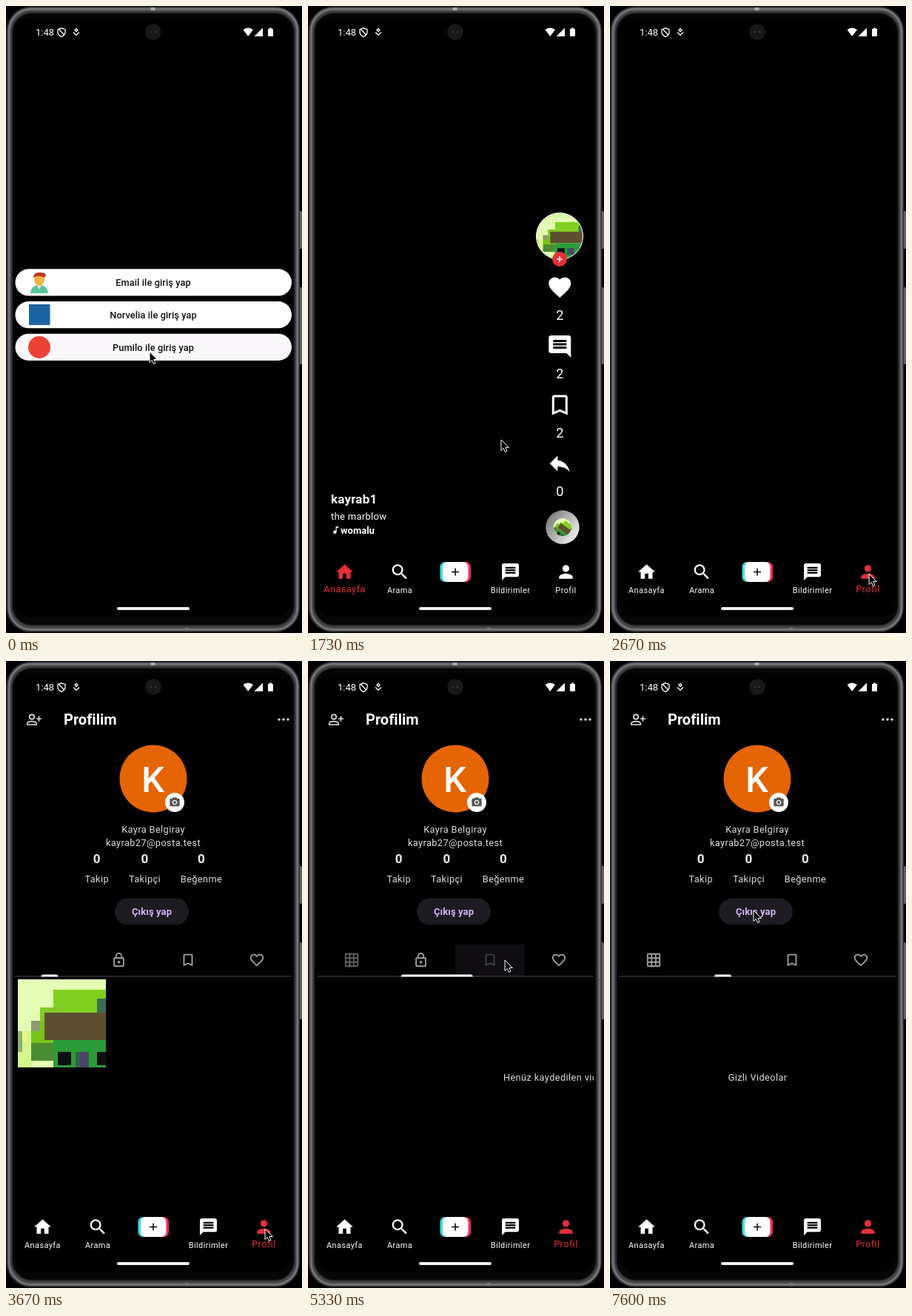
These frames come from a looping animation (400x847 px, 8000 ms). An HTML page:

```html
<!DOCTYPE html>
<html lang="tr">
<head>
<meta charset="utf-8">
<style>
  html, body { margin: 0; width: 100%; height: 100%; overflow: hidden; background: #000; }
  svg { display: block; width: 100%; height: 100%; font-family: Roboto, sans-serif; }
</style>
</head>
<body>
<svg id="stage" viewBox="0 0 400 847"></svg>
<script>
const LOOP = 8000, PAGE = 374, RED = '#e32f38', GREY = 160;

const ICONS = {
  home: 'M10 20v-6h4v6h5v-8h3L12 3 2 12h3v8z',
  search: 'M15.5 14h-.79l-.28-.27C15.41 12.59 16 11.11 16 9.5 16 5.91 13.09 3 9.5 3S3 5.91 3 9.5 5.91 16 9.5 16c1.61 0 3.09-.59 4.23-1.57l.27.28v.79l5 4.99L20.49 19zm-6 0C7.01 14 5 11.99 5 9.5S7.01 5 9.5 5 14 7.01 14 9.5 11.99 14 9.5 14z',
  message: 'M20 2H4c-1.1 0-2 .9-2 2v18l4-4h14c1.1 0 2-.9 2-2V4c0-1.1-.9-2-2-2zM18 14H6v-2h12zm0-3H6V9h12zm0-3H6V6h12z',
  comment: 'M22 4c0-1.1-.9-2-2-2H4c-1.1 0-2 .9-2 2v12c0 1.1.9 2 2 2h14l4 4zM18 14H6v-2h12zm0-3H6V9h12zm0-3H6V6h12z',
  person: 'M12 12c2.21 0 4-1.79 4-4s-1.79-4-4-4-4 1.79-4 4 1.79 4 4 4zm0 2c-2.67 0-8 1.34-8 4v2h16v-2c0-2.66-5.33-4-8-4z',
  heart: 'M12 21.35l-1.45-1.32C5.4 15.36 2 12.28 2 8.5 2 5.42 4.42 3 7.5 3c1.74 0 3.41.81 4.5 2.09C13.09 3.81 14.76 3 16.5 3 19.58 3 22 5.42 22 8.5c0 3.78-3.4 6.86-8.55 11.54z',
  heartLine: 'M16.5 3c-1.74 0-3.41.81-4.5 2.09C10.91 3.81 9.24 3 7.5 3 4.42 3 2 5.42 2 8.5c0 3.78 3.4 6.86 8.55 11.54L12 21.35l1.45-1.32C18.6 15.36 22 12.28 22 8.5 22 5.42 19.58 3 16.5 3zm-4.4 15.55l-.1.1-.1-.1C7.14 14.24 4 11.39 4 8.5 4 6.5 5.5 5 7.5 5c1.54 0 3.04.99 3.57 2.36h1.87C13.46 5.99 14.96 5 16.5 5c2 0 3.5 1.5 3.5 3.5 0 2.89-3.14 5.74-7.9 10.05z',
  bookmark: 'M17 3H7c-1.1 0-2 .9-2 2v16l7-3 7 3V5c0-1.1-.9-2-2-2zm0 15l-5-2.18L7 18V5h10z',
  reply: 'M10 9V5l-7 7 7 7v-4.1c5 0 8.5 1.6 11 5.1-1-5-4-10-11-11z',
  lock: 'M12 17c1.1 0 2-.9 2-2s-.9-2-2-2-2 .9-2 2 .9 2 2 2zm6-9h-1V6c0-2.76-2.24-5-5-5S7 3.24 7 6v2H6c-1.1 0-2 .9-2 2v10c0 1.1.9 2 2 2h12c1.1 0 2-.9 2-2V10c0-1.1-.9-2-2-2zM8.9 6c0-1.71 1.39-3.1 3.1-3.1s3.1 1.39 3.1 3.1v2H8.9zM18 20H6V10h12z',
  grid: 'M20 2H4c-1.1 0-2 .9-2 2v16c0 1.1.9 2 2 2h16c1.1 0 2-.9 2-2V4c0-1.1-.9-2-2-2z' +
    [4, 10, 16].flatMap(x => [4, 10, 16].map(y => `M${x} ${y}h4v4h-4z`)).join(''),
  note: 'M12 3v10.55c-.59-.34-1.27-.55-2-.55-2.21 0-4 1.79-4 4s1.79 4 4 4 4-1.79 4-4V7h4V3z',
  camera: 'M9 2L7.17 4H4c-1.1 0-2 .9-2 2v12c0 1.1.9 2 2 2h16c1.1 0 2-.9 2-2V6c0-1.1-.9-2-2-2h-3.17L15 2zm3 15c-2.76 0-5-2.24-5-5s2.24-5 5-5 5 2.24 5 5-2.24 5-5 5zm0-2a3 3 0 1 0 0-6 3 3 0 0 0 0 6z',
};

const icon = (name, cx, cy, size, fill = '#fff', extra = '') =>
  `<path d="${ICONS[name]}" fill="${fill}" fill-rule="evenodd" ${extra}
    transform="translate(${cx - size / 2} ${cy - size / 2}) scale(${size / 24})"/>`;
const rect = (fill, x, y, w, h, r = 0, extra = '') =>
  `<rect x="${x}" y="${y}" width="${w}" height="${h}" rx="${r}" fill="${fill}" ${extra}/>`;
const disc = (fill, x, y, r, extra = '') => `<circle cx="${x}" cy="${y}" r="${r}" fill="${fill}" ${extra}/>`;
const text = (s, x, y, size, { fill = '#fff', weight = 400, anchor = 'middle', gap = 0 } = {}) =>
  `<text x="${x}" y="${y}" font-size="${size}" font-weight="${weight}" fill="${fill}"
    text-anchor="${anchor}" letter-spacing="${gap}">${s}</text>`;
const plus = (x, y, r, color) =>
  `<path d="M${x - r} ${y}h${2 * r}M${x} ${y - r}v${2 * r}" stroke="${color}" stroke-width="1.5"/>`;
const body = { fill: '#ddd', gap: .4 };

const house = [
  ['#e4fcb4', 0, 0, 119, 119], ['#d4f48c', 0, 70, 20, 49], ['#f0f480', 4, 72, 8, 12],
  ['#80d020', 48, 14, 71, 32], ['#84c828', 30, 38, 30, 20], ['#78c41c', 18, 58, 30, 30],
  ['#8c9c70', 18, 56, 12, 14], ['#4c8c34', 18, 86, 30, 24], ['#8cb470', 0, 70, 6, 28],
  ['#5c5030', 36, 45, 83, 37], ['#3c6c54', 107, 26, 12, 19], ['#2c9c38', 48, 82, 71, 37],
  ['#0c1010', 54, 98, 18, 18], ['#34604c', 78, 98, 18, 21], ['#4c4468', 84, 98, 11, 21],
  ['#0c1010', 107, 98, 12, 18],
].map(r => rect(...r)).join('');

const video = [
  ['#fffdfe', 12, 16, 374, 728], ['#fffff2', 12, 16, 112, 39], ['#c2ff94', 124, 16, 224, 39],
  ['#fbfff0', 12, 462, 132, 282], ['#ffff74', 162, 218, 224, 111], ['#ffff74', 124, 299, 38, 30],
  ['#84e8d8', 348, 259, 38, 70], ['#e2cc4c', 124, 328, 262, 11], ['#e8d18a', 124, 339, 262, 93],
  ['#ffff74', 87, 380, 37, 82], ['#fff870', 124, 432, 19, 30], ['#f4c454', 143, 421, 19, 41],
  ['#b4ff84', 87, 462, 75, 80], ['#b4ff84', 124, 540, 38, 43], ['#eee0d0', 68, 475, 19, 61],
  ['#eee0d0', 106, 541, 18, 37], ['#eee0d0', 143, 583, 19, 161], ['#8cff92', 162, 421, 224, 204],
  ['#a0f084', 162, 624, 224, 16], ['#b4ff84', 162, 640, 224, 104], ['#123a1c', 180, 494, 56, 84],
  ['#180c10', 199, 502, 37, 76], ['#d8e8b0', 199, 578, 37, 5], ['#70cc6c', 255, 494, 56, 146],
  ['#b09cdc', 274, 502, 37, 122], ['#123a1c', 348, 494, 38, 8], ['#180c10', 348, 502, 38, 76],
  ['#d8d0a0', 348, 578, 38, 5],
].map(r => rect(...r)).join('');

function loginButton(label, y, fill, mark) {
  return rect(fill, 12.5, y, 373.5, 36.3, 18.1) + mark +
    text(label, 199, y + 23, 12.75, { fill: '#111', weight: 500, gap: .1 });
}

const login =
  loginButton('Email ile giriş yap', 355.3, '#fff',
    '<path d="M33 388q1-11 12-11t12 11z" fill="#58c49c"/><path d="M41 376l4 7 4-7z" fill="#f4e0d0"/>' +
    '<ellipse cx="45" cy="369" rx="7" ry="9" fill="#f4b444"/><path d="M37 367q0-7 8-7t9 3l-2 4q-7-4-13-1z" fill="#c03020"/>') +
  loginButton('Norvelia ile giriş yap', 399, '#fff', rect('#1a64a4', 31, 403, 28.5, 28)) +
  loginButton('Pumilo ile giriş yap', 442.7, '#faf7fa', disc('#ea4335', 45, 461, 15));

function nav(selected) {
  const items = [['home', 'Anasayfa', 49.5], ['search', 'Arama', 124], ['message', 'Bildirimler', 273.5], ['person', 'Profil', 348.5]];
  return rect('#000', 12, 744, PAGE, 64) +
    items.map(([name, label, x], i) => {
      const on = i === selected, fill = on ? RED : '#fff';
      return icon(name, x, 764.5, 27.5, fill) +
        text(label, x, on ? 791.5 : 793, on ? 12.75 : 10.9, { fill, gap: .42 });
    }).join('') +
    rect('#3cdce0', 178.5, 751, 34, 27, 6.5) + rect('#f02c5c', 186, 751, 34, 27, 6.5) +
    rect('#fff', 182, 751, 34.5, 27, 6.5) + plus(199, 764.5, 5, '#000');
}

const counters = [['heart', 380, 424], ['comment', 460, 503], ['bookmark', 539, 582.5], ['reply', 618, 661.5]];
const home =
  `<g id="video">${video}</g>` +
  text('kayrab1', 31, 672, 17, { weight: 700, anchor: 'start', gap: .2 }) +
  text('the marblow', 31, 694, 13, { anchor: 'start', gap: .3 }) +
  icon('note', 37.5, 708, 13.5) + text('womalu', 44, 713, 13, { weight: 700, anchor: 'start' }) +
  `<g clip-path="url(#round)">${rect('#d4f8ac', 308, 279, 64, 64)}${rect('#2c9c38', 334, 330, 38, 13)}
    <use href="#house" transform="translate(308 286) scale(.538 .42)"/></g>` +
  disc('none', 340, 311, 31.5, 'stroke="#fff"') + disc(RED, 340, 342, 10) + plus(340, 342, 4, '#fff') +
  counters.map(([name, y, base], i) => icon(name, 340.3, y, 36) + text(i < 3 ? 2 : 0, 340.3, base, 18.2)).join('') +
  `<g id="record">${disc('url(#metal)', .6, -3.4, 22.7)}
    <g clip-path="url(#label)"><use href="#house" transform="translate(-11.9 -15.9) scale(.21)"/></g></g>` +
  nav(0);

const tabX = [59, 152.5, 246, 339];
const profile =
  `<g id="details">
    <g fill="none" stroke="#ddd" stroke-width="1.7"><circle cx="35" cy="75.5" r="3.2"/>
    <path d="M28.8 86v-1.4q0-3 6.2-3t6.2 3V86zM41 78h7M44.5 74.5v7"/></g>` +
  text('Profilim', 78, 85.5, 20, { weight: 700, anchor: 'start' }) +
  [369, 375, 381].map(x => disc('#ccc', x, 79, 1.8)).join('') +
  disc('#e56403', 199, 159, 45.5) + text('K', 198.5, 177, 49, { weight: 500 }) +
  disc('#fff', 228, 191, 13) + icon('camera', 228, 191, 16, '#555') +
  text('Kayra Belgiray', 199, 231.5, 12.75, body) + text('kayrab27@posta.test', 199, 249.5, 12.75, body) +
  [['Takip', 122.7], ['Takipçi', 187.5], ['Beğenme', 264]].map(([label, x]) =>
    text(0, x, 273, 17, { fill: '#eee', weight: 700 }) + text(label, x, 298.5, 12.75, body)).join('') +
  rect('#1d1a21', 147, 320.5, 100, 36, 18) +
  text('Çıkış yap', 197, 343.3, 13, { fill: '#d0b4f4', weight: 700, gap: .1 }) +
  `<g clip-path="url(#tabArea)"><circle id="ripple" fill="url(#glow)"/></g>` +
  ['grid', 'lock', 'bookmark', 'heartLine'].map((n, i) => icon(n, tabX[i], 404, 22, '#000', 'class="tab"')).join('') +
  rect('#4a4a4c', 12, 425.5, PAGE, 1) + `<path id="indicator" fill="#fff"/>
    <g clip-path="url(#pages)">
      <g class="page"><use id="thumb" href="#house" x="16" y="430"/></g>
      <g class="page">${text('Gizli Videolar', 199.5, 567, 12.75, body)}</g>
      <g class="page">${text('Henüz kaydedilen video yok', 199.5, 567, 12.75, body)}</g>
      <g class="page"></g>
    </g>
  </g>` + nav(3);

const frame =
  rect('#626265', 395, 277, 5, 51, 1.5) + rect('#626265', 395, 380, 5, 104, 1.5) +
  rect('#2c2c2e', .5, .5, 396.5, 845.5, 33) +
  rect('#48484a', 4, 4, 390, 838.5, 30, 'stroke="#737376" stroke-width="3"') +
  rect('#060606', 8, 9, 382, 828, 27, 'stroke="#2c2c2e" stroke-width="2"') +
  rect('#aaa', 195, 2, 7, 4, 2) + rect('#777', 241, 840, 7, 4, 2);

const status =
  text('1:48', 40, 40, 13, { anchor: 'start' }) +
  `<g fill="none" stroke="#fff" stroke-width="1.3"><path d="M75 29.8l5 1.8v4q0 3.6-5 6-5-2.4-5-6v-4zM71 31l8 8.5"/>
    <path d="M95 30.5l2 2-2 2-2-2zM91 35.5l4 3.8 4-3.8"/></g>
  <path d="M320.5 32q6.500-5 13.5 0l-6.8 9zM347 29.5V41h-11.5zM354 31h2v-1.5h3V31h2v10h-7z" fill="#fff"/>` +
  disc('#181819', 199, 35, 10.8) + disc('#3c3038', 196, 35, 1.3) + disc('#303c40', 202, 35, 1.3) +
  rect('#eef2ee', 150, 812, 98, 4, 2);

const stage = document.getElementById('stage');
stage.innerHTML = `<defs>
    <g id="house">${house}</g>
    <clipPath id="screen">${rect('#000', 12, 16, PAGE, 809, 20)}</clipPath>
    <clipPath id="round">${disc('#000', 340, 311, 31.5)}</clipPath>
    <clipPath id="label">${disc('#000', .6, -3.4, 12)}</clipPath>
    <clipPath id="pages">${rect('#000', 12, 428, PAGE, 316)}</clipPath>
    <clipPath id="tabArea"><rect id="tabRect" y="383" width="93.5" height="43"/></clipPath>
    <linearGradient id="metal"><stop stop-color="#808080"/><stop offset="1" stop-color="#ececec"/></linearGradient>
    <radialGradient id="glow"><stop offset=".6" stop-color="#d0a8e8"/><stop offset="1" stop-color="#d0a8e8" stop-opacity="0"/></radialGradient>
  </defs>${frame}
  <g clip-path="url(#screen)">${rect('#000', 12, 16, PAGE, 809)}
    <g id="login">${login}</g><g id="home">${home}</g><g id="profile">${profile}</g>${status}
  </g>
  <path id="cursor" d="M0 0V14.5L3.3 11.5 5.5 16.5 8 15.4 5.8 10.5H10.3Z" fill="#000" stroke="#fff"/>`;

const $ = id => document.getElementById(id);
const tabs = [...stage.querySelectorAll('.tab')], pages = [...stage.querySelectorAll('.page')];
const show = (el, on) => el.setAttribute('display', on ? 'inline' : 'none');
const clamp = v => Math.max(0, Math.min(1, v));
const mix = (a, b, p) => a + (b - a) * p;

// cubic-bezier(.25, .1, .25, 1)
function ease(x) {
  let lo = 0, hi = 1;
  for (let i = 0; i < 20; i++) {
    const s = (lo + hi) / 2;
    if (.75 * s * (1 - s) + s ** 3 < x) lo = s; else hi = s;
  }
  return .3 * lo * (1 - lo) ** 2 + 3 * lo * lo * (1 - lo) + lo ** 3;
}

const HOME_AT = 1240, VIDEO_AT = 2000, PROFILE_AT = 2530, DETAILS_AT = 2800, THUMB_AT = 3200;
const slides = [{ at: 5226, from: 0, to: 2 }, { at: 5690, from: 2, to: 3 }, { at: 6638, from: 3, to: 1 }];
const cursorPath = [
  [0, 194, 467], [900, 194, 467], [1650, 261, 586], [1800, 261, 586], [2420, 350, 767], [4350, 350, 767],
  [5000, 266, 404], [5400, 266, 404], [5670, 336, 400], [6080, 336, 400], [6300, 250, 350],
  [6530, 160, 399], [6950, 160, 399], [7440, 194, 337], [LOOP, 194, 337],
];

function drawCursor(t) {
  const i = cursorPath.findIndex(k => k[0] > t);
  const [t0, x0, y0] = cursorPath[i - 1], [t1, x1, y1] = cursorPath[i];
  const p = (t - t0) / (t1 - t0), s = p * p * (3 - 2 * p);
  $('cursor').setAttribute('transform', `translate(${mix(x0, x1, s)} ${mix(y0, y1, s)})`);
}

function drawTabs(t) {
  const slide = slides.filter(s => s.at <= t).pop();
  const { from, to, at } = slide || { from: 0, to: 0, at: -LOOP };
  const age = t - at, p = ease(clamp(age / 300)), forward = to > from;

  pages.forEach((page, i) => {
    const dir = forward ? 1 : -1;
    const x = i === to ? dir * (1 - p) * PAGE : -dir * p * PAGE;
    show(page, i === to || (i === from && p < 1));
    page.setAttribute('transform', `translate(${x} 0)`);
  });
  tabs.forEach((tab, i) => {
    const c = Math.round(GREY * (i === to ? 1 - p : i === from ? p : 1));
    tab.setAttribute('fill', `rgb(${c},${c},${c})`);
  });

  // The leading edge decelerates while the trailing edge accelerates.
  const lead = Math.sin(p * Math.PI / 2), trail = 1 - Math.cos(p * Math.PI / 2);
  const left = mix(tabX[from], tabX[to], forward ? trail : lead) - 11.5;
  const right = mix(tabX[from], tabX[to], forward ? lead : trail) + 11.5;
  $('indicator').setAttribute('d', `M${left} 426.5q0-3 3-3H${right - 3}q3 0 3 3z`);

  const ripple = $('ripple');
  $('tabRect').setAttribute('x', 12 + 93.5 * to);
  ripple.setAttribute('cx', tabX[to] + 6);
  ripple.setAttribute('cy', 404);
  ripple.setAttribute('r', Math.max(0, age * .9));
  ripple.setAttribute('opacity', .075 * clamp((450 - age) / 300));
}

function draw(now) {
  const t = now % LOOP;
  show($('login'), t < HOME_AT);
  show($('home'), t >= HOME_AT && t < PROFILE_AT);
  show($('video'), t >= VIDEO_AT);
  show($('profile'), t >= PROFILE_AT);
  show($('details'), t >= DETAILS_AT);
  show($('thumb'), t >= THUMB_AT);
  $('record').setAttribute('transform', `translate(341.5 706.5) rotate(${(t - HOME_AT) * .072})`);
  drawTabs(t);
  drawCursor(t);
}

const start = performance.now();
function tick() {
  draw(performance.now() - start);
  requestAnimationFrame(tick);
}
tick();
</script>
</body>
</html>
```
